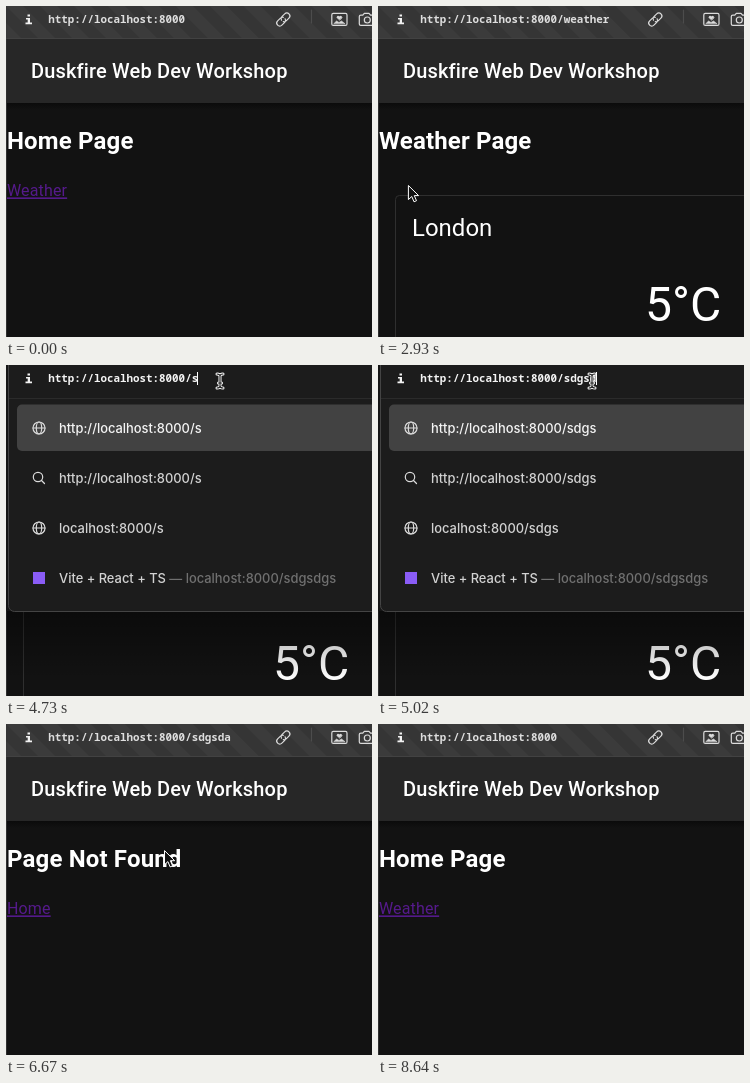
Recreate the animation shown at these times as an HTML page. Size 366x331 px, loop 9.38 s.

```html
<!DOCTYPE html>
<html lang="en">
<head>
<meta charset="utf-8">
<title>Web app walkthrough</title>
<style>
html, body { margin: 0; width: 100%; height: 100%; overflow: hidden; background: #121212; }
svg { display: block; width: 366px; height: 331px; }
text { white-space: pre; fill: #fff; }
.app { font-family: Roboto, sans-serif; letter-spacing: .15px; }
.h { font-size: 24px; font-weight: 700; }
.link { font-size: 16px; fill: #551a8b; text-decoration: underline; }
.card { font-family: Roboto, sans-serif; }
.url { font: 600 10.86px "Noto Sans Mono", "DejaVu Sans Mono", monospace; }
.row { font: 500 12.9px Inter, sans-serif; fill: #d2d2d2; }
.line { fill: none; stroke: #dcdcdc; stroke-width: 1.2; stroke-linecap: round; stroke-linejoin: round; }
</style>
</head>
<body>
<svg viewBox="0 0 366 331" xmlns="http://www.w3.org/2000/svg">
  <defs>
    <pattern id="stripes" width="24" height="24" patternUnits="userSpaceOnUse" patternTransform="rotate(-45)">
      <rect width="24" height="24" fill="#353535"/>
      <rect width="12" height="24" fill="#3b3b3b"/>
    </pattern>
    <linearGradient id="fade" x2="0" y2="1">
      <stop stop-color="#000" stop-opacity=".4"/>
      <stop offset="1" stop-color="#000" stop-opacity="0"/>
    </linearGradient>
    <g id="globe" class="line">
      <circle r="6"/><ellipse rx="2.7" ry="6"/><path d="M-6 0H6"/>
    </g>
  </defs>

  <rect width="366" height="331" fill="#121212"/>
  <rect y="97" width="366" height="7" fill="url(#fade)"/>
  <rect y="33" width="366" height="64" fill="#272727"/>
  <text class="app" x="25" y="71.5" font-size="20" font-weight="500">Duskfire Web Dev Workshop</text>

  <text id="head" class="app h" x="1" y="143"></text>
  <text id="link" class="app link" x="1" y="190.4"></text>
  <g id="card" class="card">
    <rect x="17.5" y="189.5" width="400" height="200" rx="4" fill="none" stroke="#2f2f2f"/>
    <text x="34" y="230" font-size="24">London</text>
    <text x="267" y="314.5" font-size="48">5°C</text>
  </g>
  <rect y="33" width="1" height="298" fill="#303030"/>

  <g id="bar">
    <rect width="366" height="33" fill="url(#stripes)"/>
    <rect y="32" width="366" height="1" fill="#424242"/>
    <g class="line">
      <g transform="translate(277.3 13.5) rotate(-45)">
        <path d="M1.500 -1.500A3 3 0 0 0 -1 -3H-5A3 3 0 0 0 -5 3H-1A3 3 0 0 0 1.800 .8M-1.500 1.500A3 3 0 0 0 1 3H5A3 3 0 0 0 5 -3H1A3 3 0 0 0 -1.800 -.8"/>
      </g>
      <path d="M305.5 4V17" stroke="#4c4c4c"/>
      <rect x="325.8" y="7.4" width="15.200" height="12" rx="1.5"/>
      <path d="M328 17.500L330.500 15L333 16.500L335.500 15L338.700 17.500Z" fill="#dcdcdc" stroke-width=".6"/>
      <path d="M333.400 13.800L330.800 11.400Q331.600 9.200 333.400 10.700Q335.200 9.200 336 11.400Z" fill="#dcdcdc" stroke-width=".8"/>
      <path d="M370 19.400H354.800Q353.300 19.400 353.300 18V10.500Q353.300 9.200 354.800 9.200H356.800L358.300 7.400H363L364.500 9.200H370"/>
      <circle cx="361.3" cy="14" r="3"/>
    </g>
  </g>

  <g id="focus">
    <rect width="366" height="33" fill="#1c1c1c"/>
    <g id="list">
      <rect y="246" width="366" height="69" fill="url(#fade)"/>
      <rect width="4" height="246" fill="#151515"/>
      <rect x="2.5" y="-10" width="380" height="256.5" rx="6" fill="#1c1c1c" stroke="#444"/>
      <rect x="11" y="39.5" width="370" height="46.5" rx="5" fill="#424242"/>
      <use href="#globe" x="33" y="63"/>
      <g class="line"><circle cx="32" cy="112" r="4.7"/><path d="M35.500 115.500L38.500 118.500"/></g>
      <use href="#globe" x="33" y="163"/>
      <rect x="27" y="207" width="12" height="12" fill="#8a5cf6"/>
      <text id="r0" class="row" x="53" y="67.5" style="fill:#f4f4f4"></text>
      <text id="r1" class="row" x="53" y="117.5"></text>
      <text id="r2" class="row" x="53" y="167.5"></text>
      <text class="row" x="53" y="217.5">Vite + React + TS<tspan fill="#707070"> — localhost:8000/sdgsdgs</tspan></text>
    </g>
    <rect y="33" x="3" width="363" height="1" fill="#2b2b2b"/>
    <rect id="pick" x="41" y="6" width="190" height="16" fill="#46586e"/>
  </g>

  <path d="M21.500 8.500H24V10.500H21.500ZM20 12H24V16.500H26V18.200H19.500V16.500H21.700V13.600H20Z" fill="#f2f2f2"/>
  <text id="url" class="url" x="42.3" y="17"></text>
  <rect id="caret" y="7" width="1" height="13" fill="#fff"/>

  <g id="arrow">
    <path d="M.5 .7V14.800L3.900 11.700L6.100 17L8.600 15.900L6.400 10.800H10.700Z" fill="#111" stroke="#fff" stroke-linejoin="round"/>
  </g>
  <g id="hand">
    <path d="M-1.600 9V1.600Q-1.600 0 0 0T1.600 1.600V5.500Q3.400 4.900 4 6.200Q5.800 5.500 6.500 7Q8.600 6.500 8.800 8.600V11.500Q8.800 13.500 7.600 15V16.500H.6V15.500Q-1.400 13.400 -4 10Q-4.600 8.400 -3.200 8Q-2.200 8 -1.600 9Z" fill="#fff" stroke="#111" stroke-linejoin="round"/>
    <path d="M2 10.500V14M4.100 10.500V14M6.200 10.500V14" stroke="#111"/>
  </g>
  <g id="beam" fill="none" stroke-linecap="round">
    <path d="M-3 -7Q0 -7 0 -5Q0 -7 3 -7M0 -5V5M-3 7Q0 7 0 5Q0 7 3 7M-1.500 2H1.500" stroke="#fff" stroke-width="3"/>
    <path d="M-3 -7Q0 -7 0 -5Q0 -7 3 -7M0 -5V5M-3 7Q0 7 0 5Q0 7 3 7M-1.500 2H1.500" stroke="#151515" stroke-width="1.1"/>
  </g>
</svg>
<script>
const LOOP = 9380, HOST = "localhost:8000", CHAR = 6.52;
const $ = id => document.getElementById(id);
const show = (id, on) => $(id).style.display = on ? "" : "none";
const put = (id, s) => { if ($(id).textContent !== s) $(id).textContent = s; };
const within = (t, a, b) => t >= a && t < b;

// start, end, steps, then a quadratic curve: from, bend, to
const moves = [
  [660, 770, 3, 132, 312, 128, 275, 124, 245],
  [1010, 1340, 7, 124, 245, 75, 200, 37, 187],
  [1750, 2210, 6, 37, 187, 31, 184, 26, 183],
  [2930, 3850, 17, 26, 183, 225, -30, 214, 16],
  [6500, 7130, 12, 214, 16, 20, 417, 17, 187],
  [7960, 8350, 8, 17, 187, 130, 240, 304, 318],
  [8530, 8640, 3, 304, 318, 318, 322, 326, 335]
];
const keys = [4730, 4790, 4850, 4920, 5020, 5080];

function pointer(t) {
  const m = moves.filter(m => t >= m[0]).pop();
  if (!m || t >= 8640) return null;
  const [a, b, n, x0, y0, cx, cy, x1, y1] = m;
  const p = Math.min(1, (Math.floor((t - a) / (b - a) * (n - 1)) + 1) / n);
  const k = p * p * (3 - 2 * p);
  const mix = (u, v, w) => u * (1 - k) ** 2 + 2 * v * k * (1 - k) + w * k * k;
  return [mix(x0, cx, x1), mix(y0, cy, y1)];
}

function render(t) {
  const page = within(t, 1800, 5910) ? "weather" : within(t, 5910, 7430) ? "missing" : "home";
  put("head", { home: "Home Page", weather: "Weather Page", missing: "Page Not Found" }[page]);
  put("link", { home: "Weather", weather: "", missing: "Home" }[page]);
  show("card", within(t, 1900, 5910));

  const typed = "sdgsda".slice(0, keys.filter(k => t >= k).length);
  const path = typed && t < 7430 ? "/" + typed : page === "weather" ? "/weather" : "";
  put("url", "http://" + HOST + path);

  const editing = within(t, 4080, 5790);
  show("focus", editing);
  $("focus").style.opacity = Math.min(1, Math.max(0, (t - 4080) / 230));
  $("url").style.fill = editing ? "#f4f4f4" : "#dedede";
  show("pick", t < 4730);
  show("list", t >= 4730);
  const hint = typed.length === 5 ? "sdgs" : typed;
  put("r0", "http://" + HOST + "/" + hint);
  put("r1", "http://" + HOST + "/" + hint);
  put("r2", HOST + "/" + hint);
  show("caret", within(t, 4730, 5550));
  $("caret").setAttribute("x", Math.round(42 + (22 + typed.length) * CHAR - .5));

  const at = pointer(t);
  let kind = "";
  if (at) {
    const [x, y] = at;
    const width = { home: 61, weather: 0, missing: 44 }[page];
    kind = y < 33 && x > 30 ? "beam" : x < width && y > 175 && y < 195 ? "hand" : "arrow";
    $(kind).setAttribute("transform", `translate(${x.toFixed(1)} ${y.toFixed(1)})`);
  }
  for (const id of ["arrow", "hand", "beam"]) show(id, id === kind);
}

function tick() {
  render(performance.now() % LOOP);
  requestAnimationFrame(tick);
}
tick();
</script>
</body>
</html>
```
